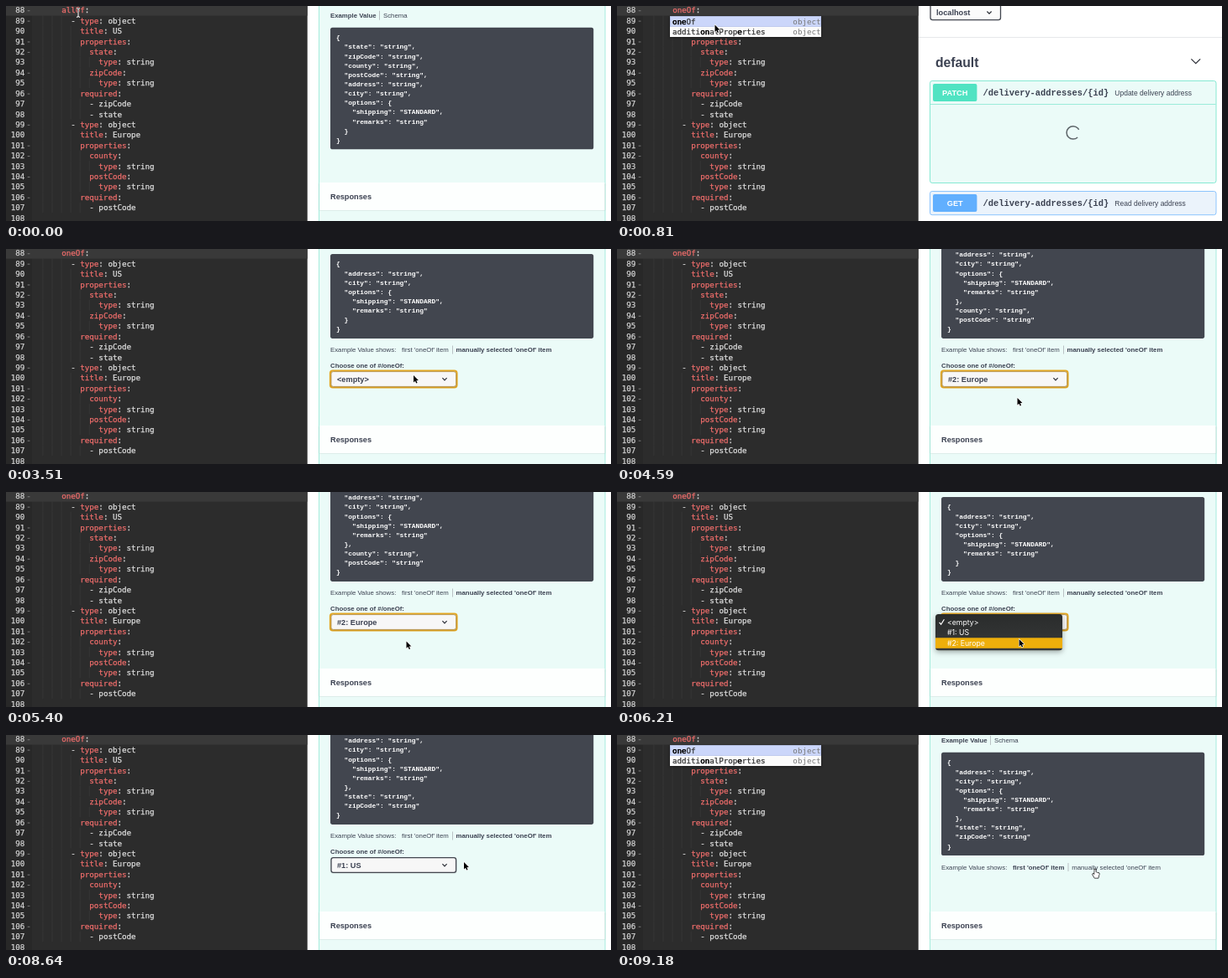
These frames come from a looping animation (720 px wide and 257 px high, 9.45 s). An HTML page with a canvas:

```html
<!DOCTYPE html>
<html lang="en">
<head>
<meta charset="utf-8">
<title>Schema editor demo</title>
<style>
html, body { margin: 0; width: 100%; height: 100%; overflow: hidden; background: #fff; }
canvas { display: block; width: 720px; height: 257px; }
</style>
</head>
<body>
<canvas id="stage"></canvas>
<script>
const W = 720, H = 257, STEP = 270, STEPS = 35, TURN = 19;
const canvas = document.getElementById('stage');
const ctx = canvas.getContext('2d');
const dpr = window.devicePixelRatio || 1;
canvas.width = W * dpr;
canvas.height = H * dpr;

const SANS = '"Liberation Sans", Arial, sans-serif';
const MONO = '"Liberation Mono", "Courier New", monospace';
const EDIT = '9.18px "DejaVu Sans Mono", monospace';
const MENU = '8.7px Inter, sans-serif';
const sans = (size, bold) => `${bold ? 'bold ' : ''}${size}px ${SANS}`;
const INK = '#3b4151', MINT = '#ebfbf8', SLATE = '#42464f', GOLD = '#eeaf0b';
const ADV = 5.526, ROW = 12.42, EDGE = 358.7;

const YAML = `      KEY:
        - type: object
          title: US
          properties:
            state:
              type: string
            zipCode:
              type: string
          required:
            - zipCode
            - state
        - type: object
          title: Europe
          properties:
            county:
              type: string
            postCode:
              type: string
          required:
            - postCode
`.split('\n');

// y is the middle of the capitals; weight thickens the strokes a little
function text(str, x, y, font, color, align = 'left', weight = 0) {
  const base = y + parseFloat(font.match(/[\d.]+px/)[0]) * 0.36;
  ctx.font = font;
  ctx.fillStyle = color;
  ctx.textAlign = align;
  ctx.fillText(str, x, base);
  if (!weight) return;
  ctx.strokeStyle = color;
  ctx.lineWidth = weight;
  ctx.strokeText(str, x, base);
}

const source = (str, x, y, color, align) => text(str, x, y, EDIT, color, align, 0.25);

function rect(x, y, w, h, color) {
  ctx.fillStyle = color;
  ctx.fillRect(x, y, w, h);
}

function box(x, y, w, h, r, fill, stroke, lw = 1) {
  ctx.beginPath();
  ctx.roundRect(x, y, w, h, r);
  if (fill) { ctx.fillStyle = fill; ctx.fill(); }
  if (stroke) { ctx.strokeStyle = stroke; ctx.lineWidth = lw; ctx.stroke(); }
}

function path(points, color, lw, fill) {
  ctx.beginPath();
  points.forEach(([x, y], i) => i ? ctx.lineTo(x, y) : ctx.moveTo(x, y));
  if (fill) { ctx.closePath(); ctx.lineJoin = 'round'; }
  ctx.strokeStyle = color;
  ctx.lineWidth = lw;
  ctx.stroke();
  if (fill) { ctx.fillStyle = fill; ctx.fill(); }
}

const chevron = (x, y, r, lw) =>
  path([[x - r, y - r / 2], [x, y + r / 2], [x + r, y - r / 2]], '#2a2d35', lw);

function shadow(color, blur, dy, draw) {
  ctx.save();
  ctx.shadowColor = color;
  ctx.shadowBlur = blur * dpr;
  ctx.shadowOffsetY = dy * dpr;
  draw();
  ctx.restore();
}

function editor(s) {
  rect(0, 0, EDGE, H, '#2c2c2c');
  rect(0, 0, 31, H, '#282828');
  rect(0, 0, EDGE, 11.6, '#393939');
  if (s.mark) rect(66, 0, 3 * ADV, 11.6, '#5a5a5a');
  YAML.forEach((raw, i) => {
    const line = raw.replace('KEY', s.key), y = 5 + i * ROW;
    const indent = line.search(/\S/);
    source(88 + i, 22.3, y, '#d2d2d2', 'right');
    if (/:$/.test(line) || /- type/.test(line)) rect(25.6, y + 0.2, 2.8, 1, '#777');
    for (let k = 2; k < indent; k += 2) {
      rect(33 + k * ADV - 0.5, y - ROW / 2, 0.7, ROW, '#3b3b3b');
    }
    if (indent < 0) return;
    let x = 33 + indent * ADV;
    const [, dash, key, rest] = line.trim().match(/^(- )?(?:(\w+)(?=:))?(.*)$/);
    if (dash) { source('-', x, y, '#ddd'); x += 2 * ADV; }
    if (key) { source(key, x, y, '#ee6d6b'); x += key.length * ADV; }
    source(rest, x, y, '#dedede');
  });
  if (s.pop) popup();
}

function popup() {
  shadow('rgba(0,0,0,.4)', 3, 1, () => rect(63, 12.4, 180, 24.6, '#fbfbfb'));
  rect(63, 12.4, 180, 12.2, '#cbd6fa');
  ctx.strokeStyle = '#aebbe6';
  ctx.lineWidth = 0.6;
  ctx.strokeRect(63.3, 12.7, 179.4, 11.7);
  [['oneOf', [0, 1, 2]], ['additionalProperties', [6, 7, 14]]].forEach(([word, hits], i) => {
    const y = 18.6 + i * ROW;
    source(word, 66, y, '#333');
    hits.forEach(k => source(word[k], 66 + k * ADV, y, '#000'));
    text('object', 242.5, y, EDIT, '#777', 'right');
  });
}

const pair = k => `  "${k}": "string"`;
function sample(mode) {
  const options = ['  "options": {', '    "shipping": "STANDARD",', '    "remarks": "string"', '  }'];
  const head = ['address', 'city'].map(k => pair(k) + ',');
  const extra = { us: ['state', 'zipCode'], eu: ['county', 'postCode'] }[mode];
  if (mode === 'all') {
    head.unshift(...['state', 'zipCode', 'county', 'postCode'].map(k => pair(k) + ','));
  }
  const tail = extra ? [pair(extra[0]) + ',', pair(extra[1])] : [];
  if (extra) options[3] += ',';
  return ['{', ...head, ...options, ...tail, '}'];
}

function code(mode, lastY) {
  const lines = sample(mode), pitch = 11.14;
  const first = lastY - (lines.length - 1) * pitch;
  box(386, first - 11.7, 313.2, lastY - first + 23, 2.6, SLATE);
  lines.forEach((l, i) => text(l, 393, first + i * pitch, `bold 7.88px ${MONO}`, '#fff'));
}

function tabs(y) {
  text('Example Value', 386, y, sans(7.8, true), INK);
  rect(444, y - 5.5, 0.8, 11, '#aeb5b8');
  text('Schema', 449, y, sans(7.8), INK);
}

function shows(y, manual) {
  const bar = manual ? 531 : 536.6;
  text('Example Value shows:', 386, y, sans(7.8), INK);
  text("first 'oneOf' item", 471, y, sans(7.8, !manual), INK);
  rect(bar, y - 5, 0.8, 10, '#aeb5b8');
  text("manually selected 'oneOf' item", bar + 4.6, y, sans(7.8, manual), INK);
}

const CHOICES = ['<empty>', '#1: US', '#2: Europe'];
function picker(s) {
  text('Choose one of #/oneOf:', 386, 139.5, sans(7.8, true), INK);
  if (s.ring) box(385.8, 145.5, 150.8, 20, 3, null, '#e5a824', 1.9);
  shadow('rgba(0,0,0,.25)', 2, 0.7, () => box(387, 146.6, 148.6, 17.8, 2.6, '#f7f7f7'));
  box(387, 146.6, 148.6, 17.8, 2.6, null, s.ring ? '#b08a3c' : SLATE, s.ring ? 0.8 : 1.3);
  text(CHOICES[s.pick], 394, 155.5, sans(9.2, true), INK);
  chevron(522, 155.5, 2.6, 1.2);
  if (s.hover !== undefined) menu(s);
}

function menu(s) {
  const top = 155.5 - s.pick * 12.5;
  const glass = ctx.createLinearGradient(0, top - 9, 0, top + 34);
  glass.addColorStop(0, '#2a2c2c');
  glass.addColorStop(1, '#373939');
  shadow('rgba(0,0,0,.35)', 6, 2, () => box(379, top - 9.4, 151, 43.2, 3.5, glass));
  rect(379, top + s.hover * 12.5 - 6.2, 151, 12.5, GOLD);
  CHOICES.forEach((c, i) => text(c, 393, top + i * 12.5, MENU, '#fff'));
  path([[383.6, 155.8], [385.6, 158.2], [389.4, 152.2]], '#fff', 1.2);
}

function details(s) {
  rect(372.5, 0, 340.5, H, MINT);
  rect(372, 0, 1, H, '#a6ecdd');
  rect(712.5, 0, 1, H, '#a6ecdd');
  shadow('rgba(0,0,0,.15)', 1.5, 0.6, () => rect(373, 211, 339.5, 33, '#fdfffe'));
  text('Responses', 386, 227.3, sans(9.2, true), INK);
  if (s.view === 'all') {
    tabs(11.2);
    code('all', 160);
  } else if (s.view === 'first') {
    tabs(6.4);
    code('us', 132.8);
    shows(158, false);
  } else {
    code(['none', 'us', 'eu'][s.pick], 95.6);
    shows(120.5, true);
    picker(s);
  }
}

function operation(y, h, method, color, tint, line, note) {
  box(372.5, y, 340.5, h, 2.6, tint, line);
  box(376, y + 3.6, 52.4, 21, 2, color);
  const mid = y + 14.1;
  text(method, 402.2, mid, sans(9.2, true), '#fff', 'center');
  text('/delivery-addresses/{id}', 435.5, mid, `bold 10.4px ${MONO}`, INK);
  text(note, 592.3, mid, sans(8.5), INK);
}

function loading(t) {
  box(373, -8, 83.5, 24.6, 2.6, '#fbfbfb', SLATE, 1.3);
  text('localhost', 380, 7.5, sans(9.2, true), INK);
  chevron(443, 7.8, 2.6, 1.2);
  rect(359, 37, 361, 1, '#e6e8ea');
  text('default', 379, 67.6, sans(15.7, true), INK);
  chevron(688.8, 66, 5.4, 1.2);
  operation(89.5, 122, 'PATCH', '#50e3c2', MINT, '#86e9d3', 'Update delivery address');
  rect(373, 117, 339.5, 0.8, '#86e9d3');
  operation(221.5, 28.2, 'GET', '#61affe', '#ebf3fb', '#8cc4fd', 'Read delivery address');
  const turn = (t / STEP - 3) * Math.PI / 2;
  ctx.beginPath();
  ctx.arc(542.8, 151.4, 7.7, turn + 0.8, turn + 5.8);
  ctx.strokeStyle = '#5c6468';
  ctx.lineWidth = 1.5;
  ctx.stroke();
}

const POINTERS = {
  arrow() {
    path([[0, 0], [0, 8.4], [1.9, 6.7], [3.2, 9.6], [4.6, 9], [3.3, 6.2], [5.9, 6]], '#fff', 1.2, '#000');
  },
  beam() {
    const bar = [[-2, -5], [0, -4], [2, -5], [0, -4], [0, 5], [-2, 6], [0, 5], [2, 6]];
    path(bar, '#222', 2.2);
    path(bar, '#fff', 1.1);
  },
  hand() {
    path([[-1.6, -5], [-0.4, -5], [-0.2, -1.4], [3.2, -0.6], [3.9, 0.4], [3.2, 3.2], [2.6, 5.2],
      [-1.6, 5.2], [-4, 1.2], [-3.4, 0.3], [-1.8, 1.6]], '#111', 1.4, '#fff');
  }
};

const pre = { key: 'allOf', view: 'all' };
const first = { pop: true, view: 'first' };
const list = (pick, hover) => ({ pick, hover, ring: true });
const at = (state, shape, x, y) => ({ key: 'oneOf', ...state, shape, x, y });
const SCENES = [
  at(pre, 'beam', 86, 7.5),
  at({ ...pre, mark: true }, 'beam', 71, 7.5),
  at({ view: 'all', pop: true }),
  at({ view: 'load', pop: true }, 'arrow', 116.5, 22.5),
  at(first, 'hand', 570, 165.5),
  at(first, 'hand', 569, 160),
  at({ pick: 1 }, 'arrow', 545, 152),
  at({ pick: 1 }, 'arrow', 504.8, 149.2),
  at({ pick: 1 }, 'arrow', 503.5, 150.5),
  at(list(1, 1), 'arrow', 503.2, 150.8),
  at(list(1, 1), 'arrow', 503.2, 151),
  at(list(1, 0), 'arrow', 495, 139),
  at({ pick: 0, ring: true }, 'arrow', 493, 141),
  at({ pick: 0, ring: true }, 'arrow', 485, 151),
  at(list(0, 0), 'arrow', 482, 152),
  at(list(0, 2), 'arrow', 478.6, 176),
  at({ pick: 2, ring: true }, 'arrow', 477.6, 177),
  at({ pick: 2, ring: true }, 'arrow', 476.5, 178),
  at({ pick: 2, ring: true }, 'arrow', 476.5, 178.4),
  at({ pick: 2, ring: true }, 'arrow', 476.5, 178.8)
];

function draw(now) {
  const t = now % (STEP * STEPS);
  const i = Math.floor(t / STEP);
  // the steps run up to the turn and then backwards
  const s = SCENES[i <= TURN ? i : 2 * TURN - i];
  ctx.setTransform(dpr, 0, 0, dpr, 0, 0);
  rect(0, 0, W, H, '#fff');
  if (s.view === 'load') loading(i * STEP); else details(s);
  editor(s);
  if (s.shape) {
    ctx.save();
    ctx.translate(s.x, s.y);
    POINTERS[s.shape]();
    ctx.restore();
  }
}

const start = performance.now();
function tick() {
  draw(performance.now() - start);
  requestAnimationFrame(tick);
}
tick();
</script>
</body>
</html>
```
